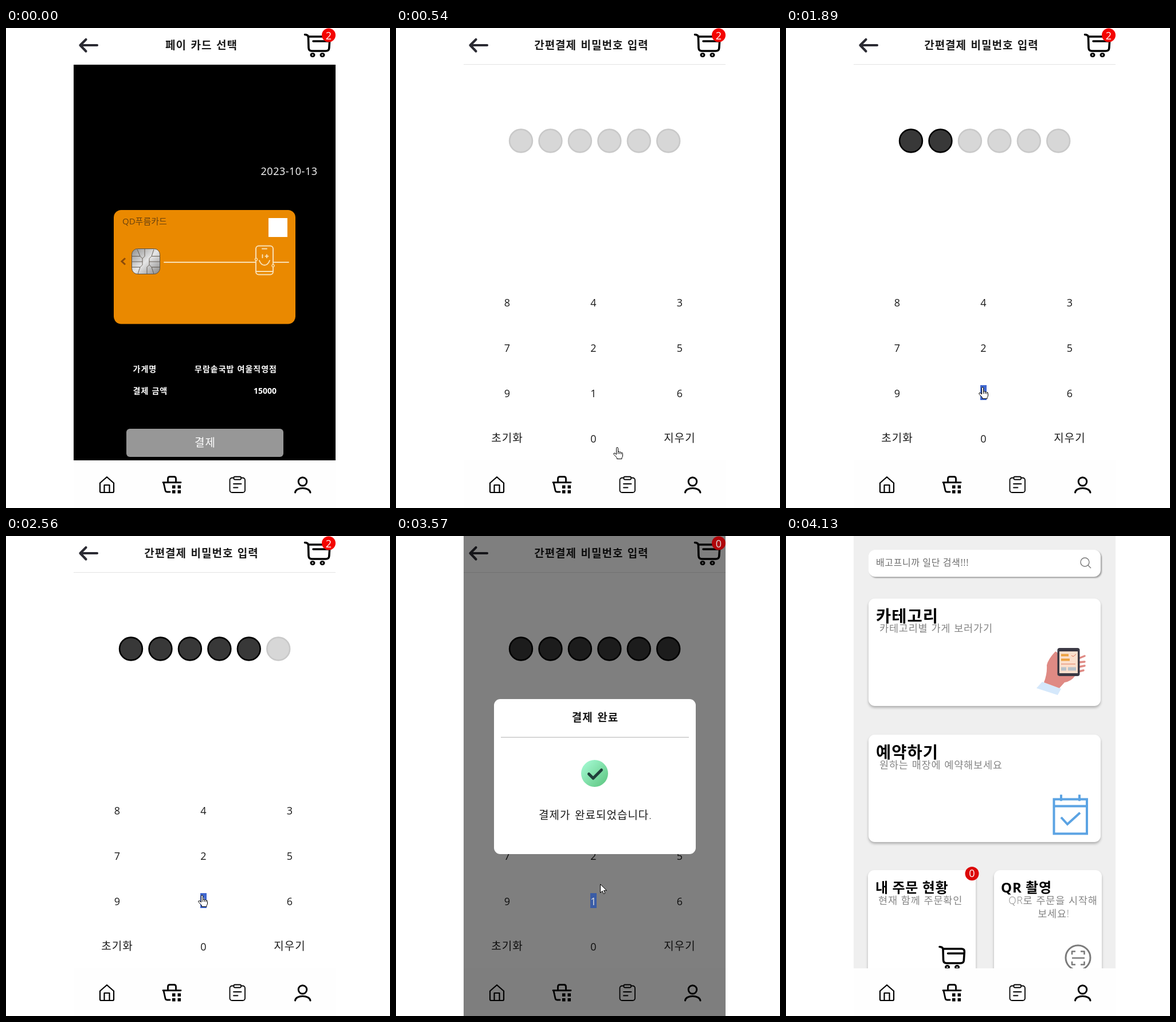
These frames come from a looping animation (670 by 836 pixels, 4380 ms). An HTML page:

```html
<!DOCTYPE html>
<html lang="ko">
<head>
<meta charset="utf-8">
<title>페이 결제</title>
<style>
html, body { margin: 0; height: 100%; overflow: hidden; background: #fff; }
svg { display: block; width: 100vw; height: 100vh; }
text { font: 19px "Open Sans", "Noto Sans CJK KR", "Noto Sans CJK", sans-serif; letter-spacing: 1px; word-spacing: 1.5px; fill: #1a1a1a; }
.mid { text-anchor: middle; }
.end { text-anchor: end; }
.bold { font-weight: 700; }
.thin { font-weight: 300; }
.num { font-size: 18px; letter-spacing: 0; }
.row text { font-size: 14px; font-weight: 700; fill: #fff; word-spacing: .5px; }
.sub text { font-size: 17.5px; font-weight: 300; letter-spacing: .8px; fill: #858585; word-spacing: .6px; }
.big { font-size: 28.5px; font-weight: 700; fill: #000; }
.small { font-size: 24px; font-weight: 700; letter-spacing: .8px; word-spacing: -.5px; fill: #000; }
.card { fill: #fff; filter: drop-shadow(0 3px 2px #0004); }
.search { fill: #fff; filter: drop-shadow(2px 2px 1px #0005); }
.line { fill: none; stroke: #000; stroke-linecap: round; stroke-linejoin: round; }
</style>
</head>
<body>
<svg viewBox="0 0 670 836">
  <defs>
    <linearGradient id="steel" x2="1" y2="1">
      <stop stop-color="#8d8d8d"/><stop offset=".5" stop-color="#e6e6e6"/><stop offset="1" stop-color="#858585"/>
    </linearGradient>
    <linearGradient id="mint" x2="1" y2="1">
      <stop offset=".1" stop-color="#a2f8d0"/><stop offset=".9" stop-color="#62c986"/>
    </linearGradient>
    <g id="cart" class="line" stroke-width="3.6">
      <path d="M521.500 11.500q6 0 6 5l.5 18q.3 5.500 5.500 5.500h24.500q5.500 0 5.800-5l1-15q.2-5-5-5H528M536 23h28"/>
      <ellipse cx="535" cy="47" rx="3" ry="2.500" stroke-width="3"/><ellipse cx="552" cy="47" rx="3" ry="2.500" stroke-width="3"/>
    </g>
    <path id="arrow" d="M.5.5V15.500L4 12.200 6.300 17.200 8.700 16.200 6.500 11.300H11.500Z" fill="#fff" stroke="#000"/>
    <g id="hand" fill="#fff" stroke="#000">
      <path d="M5.500 13V2.500q0-2 1.500-2t1.500 2V8q2-1 3 .7 2-.7 2.700.9 2.300-.4 2.300 1.900V15q0 2-1.500 3.500v2H6.500v-2L1 12.500q-.8-2 1-2.200 2 .2 3.500 2.700Z"/>
      <path d="M8.500 8v4M11.500 9v3M14.200 10v2.500" fill="none"/>
    </g>
  </defs>

  <g id="header">
    <path class="line" d="M159 30H130M139.500 20 129.500 30l10 10.500" stroke-width="4.200" style="stroke:#2b2b33"/>
    <text id="title" class="mid bold" x="341" y="37"></text>
    <use href="#cart"/>
    <path d="M118 63.500H575" stroke="#e4e4e4"/>
  </g>

  <g id="pay">
    <path d="M118 64H575V753H118Z"/>
    <text class="end" x="543.500" y="256" style="font-size:18px;letter-spacing:.5px;fill:#fff">2023-10-13</text>
    <rect x="188" y="317" width="317" height="198.500" rx="13" fill="#ea8900"/>
    <text x="203" y="342" style="font-size:15px;letter-spacing:0;fill:#6b430f">QD푸름카드</text>
    <rect x="458" y="331" width="33" height="33" fill="#fff"/>
    <path d="M208 401l-6 5.500 6 5.500" fill="none" stroke="#8a4a0a" stroke-width="3"/>
    <g fill="none" stroke="#5a5248">
      <rect x="219.500" y="384.500" width="49" height="44" rx="10" fill="url(#steel)"/>
      <path d="M220 397.500h14l4 4v11l-4 4H220M268 397.500h-14l-4 4v11l4 4h14M220 407h18M250 407h18M234 397.500l-5-12M254 397.500l4-12M234 416.500l-4 12M254 416.500l4 12M238 401.500l4-4V385M250 412.500l-4 4v12" stroke-width=".9"/>
    </g>
    <g class="line" stroke-width="2" style="stroke:#f8dfb2">
      <path d="M276 408H436M466 408h27M436 424h30M447 384.500h8M447.500 395v5M452.500 397.500h5M455 395v5M442 405q3 8 9 8t9-8"/>
      <rect x="436" y="379.500" width="30" height="50" rx="5"/>
      <circle cx="436.500" cy="403" r="2" fill="#ea8900" stroke-width="1.500"/><circle cx="466" cy="414" r="2" fill="#ea8900" stroke-width="1.500"/>
    </g>
    <g class="row">
      <text x="221.500" y="599">가게명</text><text class="end" x="473" y="599">무람솥국밥 여울직영점</text>
      <text x="221.500" y="637">결제 금액</text><text class="end" x="472" y="637" style="letter-spacing:0">15000</text>
    </g>
    <rect x="210" y="698" width="274" height="49" rx="6" fill="#979797"/>
    <text class="mid" x="347.500" y="729" style="fill:#fff">결제</text>
  </g>

  <g id="pin">
    <g id="dots" stroke-width="2.600"></g>
    <g id="keys"></g>
  </g>

  <g id="home">
    <path d="M118 0H575V753H118Z" fill="#efefef"/>
    <rect class="search" x="144" y="24" width="405" height="47" rx="12"/>
    <text x="157" y="52" style="font-size:16px;letter-spacing:.6px;word-spacing:0;fill:#6c6c6c">배고프니까 일단 검색!!!</text>
    <path d="M526.500 50.500l5.500 5.500M514 45.500a7.500 7.500 0 1 0 15 0a7.500 7.500 0 1 0-15 0" fill="none" stroke="#777" stroke-width="1.400"/>
    <rect class="card" x="144" y="109" width="405" height="187" rx="11"/>
    <rect class="card" x="144" y="346" width="405" height="187" rx="11"/>
    <rect class="card" x="143" y="582" width="188" height="187" rx="11"/>
    <rect class="card" x="363" y="582" width="188" height="187" rx="11"/>
    <text class="big" x="157" y="149.500">카테고리</text>
    <text class="big" x="157" y="386.500">예약하기</text>
    <text class="small" x="156" y="621">내 주문 현황</text>
    <text class="small" x="375" y="621">QR 촬영</text>
    <g class="sub">
      <text x="163" y="167">카테고리별 가게 보러가기</text>
      <text x="163" y="404.500">원하는 매장에 예약해보세요</text>
      <text x="161" y="640.500">현재 함께 주문확인</text>
      <text class="mid" x="466" y="641">QR로 주문을 시작해</text>
      <text class="mid" x="467" y="664">보세요!</text>
    </g>
    <path d="M447 254l33 12-6 11-37-12Z" fill="#d5e8fb"/>
    <path d="M450 255q6-15 5-30 2-10 15-24l5 3v40h29q-6 9-18 11l-9 10Z" fill="#df8a84"/>
    <path class="line" d="M511 213l10-4M511 220l10-1M511 228l10-2M511 236l8-2" stroke-width="3.500" style="stroke:#df8a84"/>
    <rect x="473.500" y="195" width="39" height="49" rx="4" fill="#3b3944"/>
    <path d="M477 201h32v38h-32Z" fill="#fbdfcc"/>
    <path d="M480 207.500h13M480 215.500h15" stroke="#eda23f" stroke-width="4"/>
    <path d="M498 208l3 2 5-4M480 223h25" fill="none" stroke="#e0795c"/>
    <path d="M480 231.500h9M492 231.500h14" stroke="#b9c2c9" stroke-width="6"/>
    <path d="M467.500 458.500H525V518.500H467.500ZM467 470.500H525M480 450.500v11M512 450.500v11M480 490l11 12 22-20" fill="none" stroke="#5ba3e3" stroke-width="4"/>
    <use href="#cart" x="-253.500" y="704"/>
    <g class="line" stroke-width="3" style="stroke:#7b7b7b">
      <circle cx="509.500" cy="734.500" r="21.500"/>
      <path d="M499 735h22M499 729v-5.500h6M514 723.500h6.500v5.500M499 741v5.500h6M514 746.500h6.500V741" stroke-linecap="butt" stroke-width="2.600"/>
    </g>
    <circle cx="324.500" cy="588" r="12" fill="#dc0808"/>
    <text class="mid num" x="324.500" y="594" style="fill:#fff">0</text>
  </g>

  <g class="line" stroke-width="2.200">
    <path d="M118 753H575V836H118Z" fill="#fefefe" stroke="none"/>
    <path d="M164 792.500L176 782l12 10.500V807q0 2-2 2H166q-2 0-2-2ZM171.500 808.500V796h9v12.500"/>
    <path d="M274 791.500h31M282.500 791v-6q0-3.500 3.500-3.500h7q3.500 0 3.500 3.500v6M275 792l3 13.500q.6 2.500 3 2.500h5" stroke-width="2.800"/>
    <path d="M290 796.500h5.500v5.500H290ZM299.500 796.500h5.500v5.500h-5.500ZM290 805h5.500v5.500H290ZM299.500 805h5.500v5.500h-5.500Z" fill="#000" stroke="none"/>
    <rect x="390.500" y="783.500" width="26.500" height="25.500" rx="4" stroke-width="1.800"/>
    <rect x="397.500" y="781.500" width="12.500" height="5" rx="1.500" fill="#fefefe" stroke-width="1.800"/>
    <path d="M397 794h13.500M397 800.500h7.500" stroke-width="1.800"/>
    <circle cx="517.500" cy="790" r="7.300" stroke-width="2.900"/>
    <path d="M504.500 809c1-10 25-10 26.500 0" stroke-width="3"/>
  </g>

  <path id="dim" d="M118 0H575V836H118Z" fill-opacity=".5"/>

  <g id="badge">
    <circle cx="563" cy="12.500" r="12"/>
    <text class="mid num" x="563" y="19.500"></text>
  </g>

  <g id="pick">
    <path d="M339 622h11v26h-11Z"/>
    <text class="mid num" x="344.500" y="643" style="fill:#ddd">1</text>
  </g>

  <g id="modal">
    <rect x="171" y="284" width="352" height="270" rx="11" fill="#fff"/>
    <text class="mid bold" x="347.500" y="323">결제 완료</text>
    <path d="M183 350.500H511" stroke="#b4b4b4"/>
    <circle cx="346.500" cy="413.500" r="23.500" fill="url(#mint)"/>
    <path class="line" d="M336.500 414.500l7.500 7.500 14.500-14.500" stroke-width="5" style="stroke:#213f3b"/>
    <text class="mid thin" x="348" y="493">결제가 완료되었습니다.</text>
  </g>

  <use id="cursor"/>
</svg>
<script>
const LOOP = 4380;
// start time, scene, filled dots, cursor shape and position
const steps = [
  [0, 'pay', 0],
  [190, 'pay', 0, 'arrow', 386, 731],
  [540, 'pin', 0, 'hand', 379, 730],
  [870, 'pin', 0, 'hand', 367, 543],
  [1210, 'pin', 0, 'hand', 364, 569],
  [1550, 'pin', 1, 'hand', 339, 618],
  [1890, 'pin', 2, 'hand', 336, 625],
  [2230, 'pin', 4, 'hand', 336, 625],
  [2560, 'pin', 5, 'hand', 335, 625],
  [2900, 'done', 6, 'arrow', 342, 625],
  [3570, 'done', 6, 'arrow', 356, 606],
  [3910, 'home', 0, 'arrow', 562, 798],
  [4130, 'home', 0]
];
const el = id => document.getElementById(id);
const show = (id, on) => el(id).style.display = on ? '' : 'none';

el('dots').innerHTML = [0, 1, 2, 3, 4, 5]
  .map(i => `<circle cx="${218 + 51.45 * i}" cy="196.500" r="19.900"/>`).join('');
el('keys').innerHTML = ['8', '4', '3', '7', '2', '5', '9', '1', '6', '초기화', '0', '지우기'].map((key, i) => {
  const kind = key.length > 1 ? 'thin' : 'num';
  return `<text class="mid ${kind}" x="${194 + 150.5 * (i % 3)}" y="${485 + 79 * Math.floor(i / 3) - (kind === 'thin')}">${key}</text>`;
}).join('');

function draw([start, scene, filled, shape, x, y]) {
  const done = scene === 'done', pin = done || scene === 'pin';
  show('header', scene !== 'home');
  show('badge', scene !== 'home');
  show('pay', scene === 'pay');
  show('pin', pin);
  show('home', scene === 'home');
  show('dim', done);
  show('modal', done);
  show('pick', filled > 0);
  show('cursor', shape);

  el('title').textContent = pin ? '간편결제 비밀번호 입력' : '페이 카드 선택';
  const [disc, count] = el('badge').children;
  disc.setAttribute('fill', done ? '#b0060a' : '#f40500');
  count.textContent = done ? 0 : 2;
  count.style.fill = done ? '#ddd' : '#fff';
  el('pick').setAttribute('fill', !done ? '#4067cf' : start < 3570 ? '#1f3667' : '#3a5ca6');
  [...el('dots').children].forEach((dot, i) => {
    dot.setAttribute('fill', i < filled ? '#383838' : '#d7d7d7');
    dot.setAttribute('stroke', i < filled ? '#000' : '#c9c9c9');
  });
  if (shape) {
    el('cursor').setAttribute('href', '#' + shape);
    el('cursor').setAttribute('transform', `translate(${x} ${y})`);
  }
}

let current;
function tick() {
  const t = performance.now() % LOOP;
  const step = steps.findLast(s => s[0] <= t);
  if (step !== current) draw(current = step);
  requestAnimationFrame(tick);
}
tick();
</script>
</body>
</html>
```
